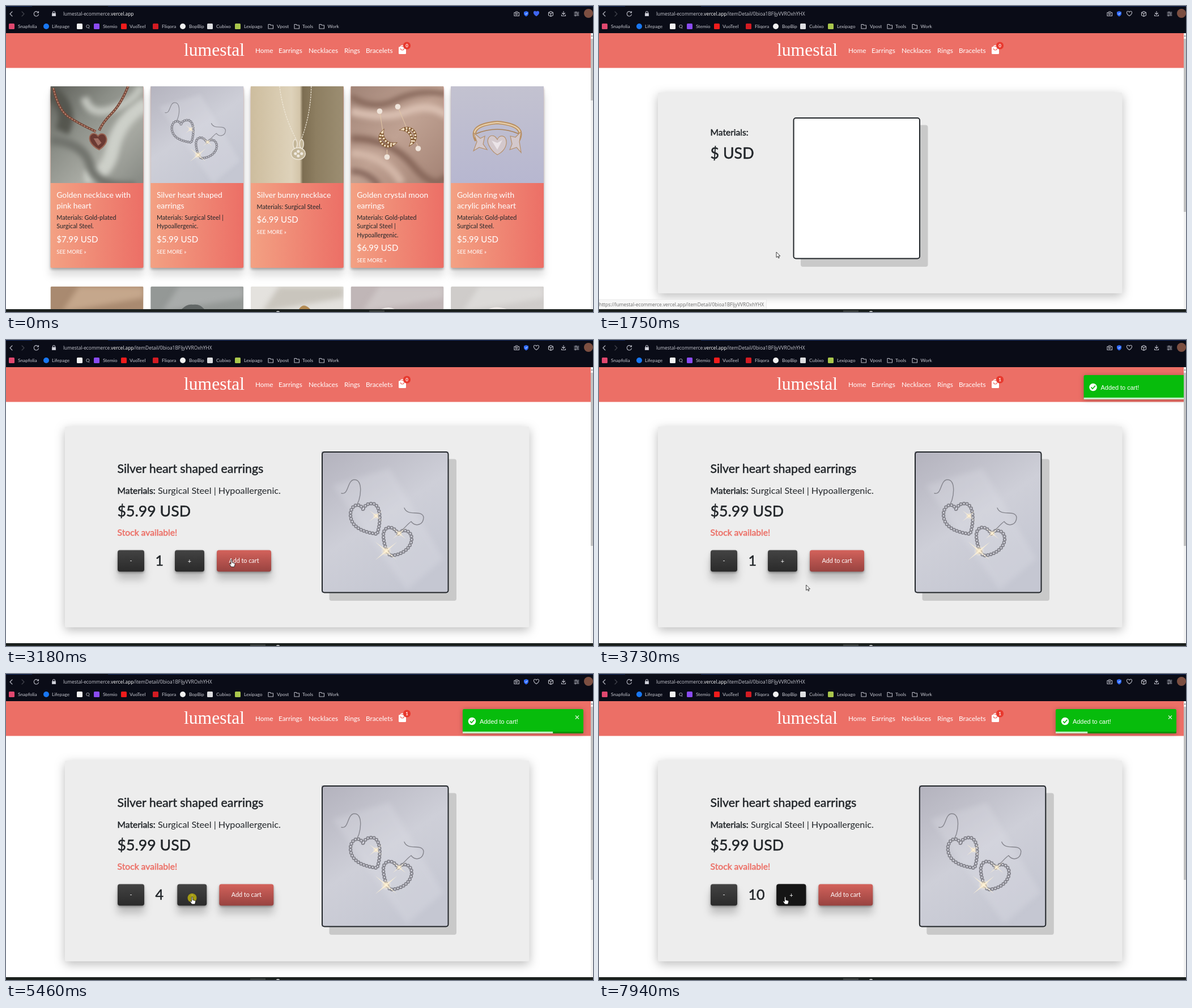
Recreate the animation shown at these times as an HTML page. Size 1036x541 px, loop 8000 ms.

```html
<!DOCTYPE html>
<html lang="en">
<head>
<meta charset="utf-8">
<title>Jewellery shop</title>
<style>
html, body { margin: 0; width: 100%; height: 100%; overflow: hidden; background: #fff }
body > svg { display: block; width: 1036px; height: 541px }
text { font-family: Lato, sans-serif; white-space: pre }
.ui { font: 8.4px "Open Sans", sans-serif; fill: #c9cad2 }
.nav { font-size: 11.8px; fill: #fff }
.logo { font: 31.6px "Liberation Serif", serif; fill: #fff }
.title { font-size: 13.9px; fill: #fff }
.mat { font-size: 10.8px; fill: #212529 }
.price { font-size: 15.1px; fill: #fff }
.more { font-size: 9.4px; fill: #fff }
.dark { fill: #212529 }
.mid { stroke: currentColor; stroke-width: .5; fill: currentColor; color: #212529 }
.line { fill: none; stroke: #b9bac4; stroke-width: 1.1; stroke-linecap: round; stroke-linejoin: round }
.card { filter: drop-shadow(0 3px 2px #0004) drop-shadow(0 13px 7px #0002) }
.panel { filter: drop-shadow(0 5px 9px #0004) }
.btn { filter: drop-shadow(0 2px 2px #0005) drop-shadow(0 13px 7px #0003) }
.soft { filter: blur(5px) }
</style>
</head>
<body>
<svg viewBox="0 0 1036 541">
<defs>
  <linearGradient id="peach"><stop stop-color="#f3a183"/><stop offset="1" stop-color="#ec6f66"/></linearGradient>
  <linearGradient id="black" x2="0" y2="1"><stop stop-color="#434343"/><stop offset="1" stop-color="#2a2a2a"/></linearGradient>
  <linearGradient id="red" x2="0" y2="1"><stop stop-color="#d3625b"/><stop offset="1" stop-color="#984340"/></linearGradient>
  <linearGradient id="satin" x2="1" y2="1"><stop stop-color="#5f605a"/><stop offset=".35" stop-color="#8b8e87"/><stop offset=".65" stop-color="#a9aba4"/><stop offset="1" stop-color="#868983"/></linearGradient>
  <linearGradient id="linen" x2=".6" y2="1"><stop stop-color="#b3b2bd"/><stop offset=".55" stop-color="#cecfd8"/><stop offset="1" stop-color="#c5c7d2"/></linearGradient>
  <linearGradient id="sand"><stop stop-color="#cdbd9e"/><stop offset=".44" stop-color="#ded2ba"/><stop offset=".53" stop-color="#d3c5a9"/><stop offset=".56" stop-color="#7c6d51"/><stop offset=".7" stop-color="#8d7e61"/><stop offset="1" stop-color="#9c8e72"/></linearGradient>
  <linearGradient id="mauve" x2="1" y2="1"><stop stop-color="#a28578"/><stop offset=".5" stop-color="#c0a293"/><stop offset="1" stop-color="#a38274"/></linearGradient>
  <linearGradient id="lilac" x2="0" y2="1"><stop stop-color="#c3c2d0"/><stop offset="1" stop-color="#b7b7d0"/></linearGradient>
  <radialGradient id="glow"><stop stop-color="#fffbe8"/><stop offset=".4" stop-color="#f6dfb4aa"/><stop offset="1" stop-color="#fff0"/></radialGradient>
  <g id="spark"><circle r="6" fill="url(#glow)"/><path d="M-12-10 0-1.2 12-10 1.2 0 12 10 0 1.2-12 10-1.2 0Z" fill="#fff3d6" opacity=".8"/></g>
  <g id="earrings">
    <path fill="url(#linen)" d="M0 0H225V250H0Z"/>
    <path class="soft" fill="#e3e4eb" opacity=".25" d="M20 60 120 30 215 190 150 245Z"/>
    <g fill="none" stroke="#85858d" stroke-width="1.4" stroke-linecap="round">
      <path d="M35 74C48 78 45 50 58 50S70 72 66 86L63 93M146 100C152 116 176 102 180 116C180 130 166 134 158 124C152 128 148 134 143 138"/>
      <path id="beads" stroke-width="6.5" stroke-dasharray="0 5.4" d="M73 102C66 88 50 96 51 113C52 130 66 142 98 146C104 128 106 100 93 93C82 90 76 96 73 102M135 146C126 128 108 132 109 150C110 165 115 178 121 184C140 184 158 172 159 155C159 138 142 136 135 146"/>
      <path stroke="#dcdce6" stroke-width="2.6" stroke-dasharray="0 5.4" d="M73 102C66 88 50 96 51 113C52 130 66 142 98 146C104 128 106 100 93 93C82 90 76 96 73 102M135 146C126 128 108 132 109 150C110 165 115 178 121 184C140 184 158 172 159 155C159 138 142 136 135 146"/>
    </g>
    <use href="#spark" x="96" y="114"/><use href="#spark" x="137" y="145"/>
    <use href="#spark" transform="translate(114 176)scale(1.6)"/>
  </g>
</defs>

<g id="list"></g>

<g id="detail">
  <rect class="panel" x="104" y="153" width="819.5" height="355" rx="2" fill="#ededed"/>
  <g id="frame">
    <rect x="13.5" y="13.5" width="224.5" height="250.5" rx="4" fill="#c9c9c9"/>
    <rect width="224" height="250" rx="4" fill="#fff"/>
    <svg id="photo" width="224" height="250"><use href="#earrings"/></svg>
    <rect x="1" y="1" width="222.5" height="248.5" rx="4" fill="none" stroke="#212529" stroke-width="2"/>
  </g>
  <g id="loading">
    <text class="mid" x="196.5" y="229" font-size="15.6">Materials:</text>
    <text class="mid" x="196.5" y="269.5" font-size="26.8">$ USD</text>
  </g>
  <g id="info">
    <text class="mid" x="196.5" y="234.5" font-size="21.3">Silver heart shaped earrings</text>
    <text class="mid" x="196.5" y="271.5" font-size="15.6">Materials:</text>
    <text class="dark" x="268" y="271.5" font-size="16.2">Surgical Steel | Hypoallergenic.</text>
    <text class="mid" x="196.5" y="312" font-size="26.7">$5.99 USD</text>
    <text class="mid" x="196.5" y="345.5" font-size="15.7" style="color:#ec6f66">Stock available!</text>
    <g font-size="10.8" fill="#fff" text-anchor="middle">
      <rect class="btn" x="197" y="371.5" width="47" height="38" rx="4" fill="url(#black)"/>
      <text x="220.5" y="394">-</text>
      <g id="buttons">
        <rect class="btn" x="298" y="371.5" width="52" height="38" rx="4" fill="url(#black)"/>
        <rect id="pressed" x="298" y="371.5" width="52" height="38" rx="4" fill="#151515"/>
        <text x="324" y="394.5">+</text>
        <rect class="btn" x="372" y="371.5" width="96" height="38" rx="4" fill="url(#red)"/>
        <text x="420" y="394">Add to cart</text>
      </g>
    </g>
    <text id="count" class="mid" x="263.5" y="399" font-size="25"></text>
  </g>
</g>

<path fill="#ec6f66" d="M0 48H1032V109.5H0Z"/>
<text class="logo" x="314" y="87.5">lumestal</text>
<g id="nav" class="nav"></g>
<path fill="#fff" d="M693 73.5q0-1.5 1.5-1.5h10q1.5 0 1.5 1.5v10q0 1.5-1.5 1.5h-10q-1.5 0-1.5-1.5z"/>
<path fill="none" stroke="#fff" stroke-width="1.3" d="M696.5 73a3 3 0 0 1 6 0"/>
<path fill="none" stroke="#ec6f66" stroke-width="1.2" d="M696.5 75a3 3 0 0 0 6 0"/>
<circle cx="707.5" cy="70" r="6.6" fill="#e8392e"/>
<text id="badge" x="707.5" y="73" font-size="8" font-weight="700" fill="#fff" text-anchor="middle"></text>

<g id="toast">
  <rect x="806" y="62" width="213" height="43" rx="2.5" fill="#07bc0c" style="filter:drop-shadow(0 1px 4px #0004)"/>
  <circle cx="822.5" cy="83.5" r="6.8" fill="#fff"/>
  <path d="M819 83.5l2.6 2.7 4.8-5.4" fill="none" stroke="#07bc0c" stroke-width="1.7"/>
  <text x="836" y="87.5" style="font:10.9px 'Liberation Sans',sans-serif" fill="#fff">Added to cart!</text>
  <path d="M1005 73.5l6 6m0-6l-6 6" stroke="#d5f3d6" stroke-width="1.3"/>
  <path d="M806 102H1019V105H806Z" fill="#003c00" opacity=".35"/>
  <rect id="bar" x="806" y="101.8" height="3.2" fill="#c3eec5"/>
</g>

<path fill="#f1f1f1" d="M1032 48h4v488h-4z"/>
<path fill="#777" d="M1032.5 54l1.5-2.5 1.5 2.5z"/>
<rect id="thumb" x="1032" y="58" width="4" fill="#c1c1c1"/>

<path fill="#0a0c17" d="M0 0H1036V48H0Z"/>
<path fill="#12285c" d="M0 0h46v1H0zM180 0h856v1H180z"/>
<g class="line">
  <path d="M11 10l-4 4 4 4"/>
  <path d="M28 10l4 4-4 4" stroke="#44464f"/>
  <path d="M57 11.5a4.2 4.2 0 1 0 .5 3.5M57.5 9.5v2.5h-2.5"/>
  <path d="M82.5 13v-1.5a2 2 0 0 1 4 0V13"/><path d="M81.5 13h6v4.5h-6z" fill="#d5d6de"/>
  <path d="M897 11.5h2l1-1.5h2.5l1 1.5h2v6H897z"/><circle cx="901" cy="14" r="1.6"/>
  <path d="M961.5 9.5l4 2v5l-4 2-4-2v-5zM957.5 11.5l4 2 4-2M961.5 13.5v5"/>
  <path d="M984 9.5v5.5m-2.5-2.5l2.5 2.5 2.5-2.5M980.5 15.5v2h7v-2"/>
  <path d="M1003 11.2h8M1003 14h8M1003 16.8h8M1006 10v2M1009 13v2M1005 16v2" stroke-width="1"/>
</g>
<path fill="#2f6bff" d="M914 10.5l4-1.5 4 1.5v3q0 3-4 5-4-2-4-5z"/>
<path d="M916.2 13.5l1.5 1.5 2.5-3" fill="none" stroke="#fff"/>
<path id="heart" class="line" d="M936 17.5C929 13 931.5 8.5 934 9.3q1.5.3 2 1.7.5-1.4 2-1.7C940.500 8.5 943 13 936 17.5Z"/>
<circle cx="1028" cy="13" r="8" fill="#7c4f41"/>
<text class="ui" x="101" y="17"><tspan>lumestal-ecommerce.</tspan><tspan fill="#fff">vercel.app</tspan><tspan id="path"></tspan></text>
<g id="marks" class="ui"></g>

<g id="status">
  <path fill="#f7f7f7" stroke="#ddd" stroke-width=".6" d="M0 519H295.5V536H0Z"/>
  <text class="ui" x="0" y="530.5" style="fill:#6a6a6a"></text>
</g>
<path fill="#1b201e" d="M0 536H1036V541H0Z"/>
<rect id="task" y="538" width="27" height="3" fill="#393e3c"/>
<path fill="#b8bab9" d="M477 541a3 2 0 0 1 6 0z"/>

<circle id="click" r="8" fill="#b3a90f" opacity=".88"/>
<g id="mouse" fill="#fff" stroke="#111" stroke-width=".8" stroke-linejoin="round">
  <path id="arrow" d="M0 0V9.5L2.3 7.5 3.8 10.8 5.2 10.2 3.8 7H6.8Z"/>
  <path id="hand" d="M-1 0C-1-1.2 1-1.2 1 0V4.5L5 5.5C6.3 5.8 6.3 7 6 8L5 12H-.5L-3.5 7.5C-3.5 6-2.5 6-1 7.5Z"/>
</g>
</svg>

<script>
const $ = id => document.getElementById(id);
const show = (id, on) => $(id).style.display = on ? '' : 'none';
const put = (id, name, value) => $(id).setAttribute(name, value);
const text = (cls, x, y, s) => `<text class="${cls}" x="${x}" y="${y}">${s}</text>`;

const itemPath = '/itemDetail/0bioa1BFljyVVROxhYHX';

$('nav').innerHTML = [['Home', 440], ['Earrings', 481], ['Necklaces', 534], ['Rings', 597], ['Bracelets', 635]]
  .map(([s, x]) => text('', x, 83, s)).join('');

// Bookmarks: label, icon centre, label start, icon colour, round or square
$('marks').innerHTML = [
  ['Snapfolia', 10, 21, '#e0486f', 0], ['Lifepage', 71, 81, '#1877f2', 1], ['Q', 130, 141, '#f2f2f2', 0],
  ['Stemio', 160, 171, '#8a4bf0', 0], ['VuoTeel', 208, 218, '#f01c1c', 0], ['Fliqora', 264, 275, '#d31b22', 0],
  ['BopBip', 312, 323, '#f0f0f0', 1], ['Cubixo', 360, 371, '#dcdde0', 0], ['Lexipago', 409, 420, '#a9c64c', 0],
  ['Vpost', 467, 478], ['Tools', 513, 523], ['Work', 557, 567.5]
].map(([s, c, x, fill, round]) => (fill
  ? `<rect x="${c - 5}" y="31" width="10" height="10" rx="${round ? 5 : 1.5}" fill="${fill}"/>`
  : `<path class="line" d="M${c - 4} 32.5h3l1.5 1.5h4v6h-8.5z"/>`) + text('', x, 39, s)).join('');

$('status').lastElementChild.textContent = 'https://lumestal-ecommerce.vercel.app' + itemPath;

const fill = id => `<path d="M0 0H164V171H0Z" fill="url(#${id})"/>`;
const gems = (color, r, ...points) => points.map(([x, y]) =>
  `<circle cx="${x}" cy="${y}" r="${r}" fill="${color}"/>`).join('');
const stroke = (color, w, d, more = '') => `<path d="${d}" fill="none" stroke="${color}" stroke-width="${w}" ${more}/>`;
const fold = (color, w, d) => stroke(color, w, d, 'class="soft"');

const chain = 'M5 3Q14 42 32 54T80 80M137 0Q124 32 108 48T86 78';
const pendant = fill('satin') +
  fold('#cdd0c9', 24, 'M170 30Q120 60 110 110T60 160') +
  fold('#71736d', 16, 'M0 95Q60 100 70 140T150 176') +
  fold('#55564f', 26, 'M0 10Q40 40 20 80') +
  fold('#c3c6bf', 14, 'M60 20Q70 55 110 40T160 0') +
  stroke('#754638', 4.5, chain) + stroke('#c08e78', 1.6, chain, 'stroke-dasharray="3 2"') +
  `<path d="M84 88C76 78 66 86 70 97Q74 106 86 112 100 102 99 93C97 82 88 82 84 88Z" fill="#6b3a33" stroke="#9a6453" stroke-width="2"/>
   <path d="M76 92l8 0 6 8-6 5z" fill="#a27065"/>`;

const bunny = fill('sand') +
  stroke('#efe8d9', 1.2, 'M51 0Q57 50 81 95M107 0Q106 50 89 95', 'stroke-dasharray="3 1.5"') +
  `<g fill="#c3b698" stroke="#eee7da" stroke-width="1.4">
   <ellipse cx="78.5" cy="102" rx="3.5" ry="8"/><ellipse cx="90" cy="102" rx="3.5" ry="8"/><ellipse cx="84" cy="119" rx="12.5" ry="10.5"/></g>` +
  gems('#efe9e0', 2.6, [79, 119], [84, 123], [90, 119], [84, 115]);

const crescents = 'M56 81A14 14 0 1 0 76 102A19 19 0 0 1 56 81ZM92 76A14 14 0 1 1 107 101A19 19 0 0 0 92 76Z';
const moons = fill('mauve') +
  fold('#846558', 9, 'M0 18Q40 44 80 24T170 14') +
  fold('#d9bfb1', 14, 'M0 44Q60 60 100 44T170 52') +
  fold('#866659', 12, 'M0 92Q70 92 110 140T170 158') +
  fold('#d3b7a8', 14, 'M0 118Q60 120 90 171') +
  fold('#84655a', 10, 'M0 150Q30 150 50 176') +
  stroke('#e2c7a6', 1, 'M51 44L57 82M83 36L98 72M64 112V122M116 100L119 108') +
  stroke('#80572f', 5, crescents) + stroke('#efdcc0', 3.4, crescents, 'stroke-dasharray="3 2.4"') +
  gems('#efe4da', 4.8, [51, 44], [83, 36], [64, 125], [119, 110]);

const ring = fill('lilac') +
  stroke('#a98056', 1.5, 'M44 84Q82 68 120 84') +
  stroke('#b88e60', 6, 'M45 96Q30 68 82 64 134 68 119 96') +
  stroke('#e6cda8', 2.5, 'M43 90Q34 69 82 64 130 69 121 90') +
  `<g fill="#d3c8cc" stroke="#b5906c" stroke-width="1.2">
   <path d="M82 94C74 80 60 90 67 104Q72 115 82 121 96 114 98 101C99 86 86 84 82 94Z"/>
   <path d="M40 82L52 92 60 88 57 102 64 112 50 108 40 114 46 98Z"/><path d="M124 80L114 90 105 88 108 102 104 112 116 108 124 117 121 98Z"/></g>
   <path d="M72 96l10 4 9-5-9 17z" fill="#ebe4e8"/>`;

const hearts = '<use href="#earrings" transform="translate(0 -8)scale(.735)"/>';

const items = [
  [['Golden necklace with', 'pink heart'], ['Materials: Gold-plated', 'Surgical Steel.'], 7, pendant, '#a98a70', '#c5a78c'],
  [['Silver heart shaped', 'earrings'], ['Materials: Surgical Steel |', 'Hypoallergenic.'], 5, hearts, '#949896', '#a9acab'],
  [['Silver bunny necklace'], ['Materials: Surgical Steel.'], 6, bunny, '#e4e2de', '#c9c5bd'],
  [['Golden crystal moon', 'earrings'], ['Materials: Gold-plated', 'Surgical Steel |', 'Hypoallergenic.'], 6, moons, '#c0b6b7', '#cdc6c6'],
  [['Golden ring with', 'acrylic pink heart'], ['Materials: Gold-plated', 'Surgical Steel.'], 5, ring, '#cfccca', '#dcdad8']
];

$('list').innerHTML = items.map(([titles, mats, price, photo, dim, lit], i) => {
  const x = 78.5 + i * 176.65, left = x + 10.8;
  const matY = 339.5 + titles.length * 19, priceY = matY + mats.length * 15.7 + 8.6;
  return `<rect class="card" x="${x}" y="142" width="164" height="321" rx="2" fill="url(#peach)"/>
    <svg x="${x}" y="142" width="164" height="171">${photo}</svg>` +
    titles.map((s, k) => text('title', left, 338.5 + k * 19, s)).join('') +
    mats.map((s, k) => text('mat', left, matY + k * 15.7, s)).join('') +
    text('price', left, priceY, `$${price}.99 USD`) +
    text('more', left, priceY + 20.2, 'SEE MORE »') +
    `<svg x="${x}" y="496" width="164" height="45"><rect width="164" height="60" rx="2" fill="${dim}"/>
     <path class="soft" fill="${lit}" d="M50 0H164V20L20 45Z"/></svg>`;
}).join('') +
  '<path d="M310 536q10-10 20-8 12-2 20 8z" fill="#636867"/><path d="M517 536q8-13 20 0z" fill="#b48c55"/>' +
  '<path d="M662 536q14-6 24 0zM852 536q12-7 32 0z" fill="#eee9e7"/>';

// Eased interpolation between [time, value] keys
function track(t, keys) {
  if (t <= keys[0][0]) return keys[0][1];
  for (let i = 1; i < keys.length; i++) {
    const [t0, a] = keys[i - 1], [t1, b] = keys[i];
    if (t < t1) {
      const p = (t - t0) / (t1 - t0);
      return a + (b - a) * p * p * (3 - 2 * p);
    }
  }
  return keys.at(-1)[1];
}

const route = [[250, 893, 541], [990, 313, 435], [2200, 313, 435], [2900, 398, 389], [3450, 398, 389],
  [3800, 362, 438], [4200, 327, 412], [4400, 327, 412], [4800, 328.5, 395]];
const routeX = route.map(([t, x]) => [t, x]), routeY = route.map(([t, , y]) => [t, y]);
const plusClicks = Array.from({ length: 9 }, (_, i) => 4860 + i * 265);
const clicks = [1300, 3400, ...plusClicks];
const slide = [[3450, 240], [3870, -16], [3975, 7], [4080, -3], [4150, 0]];

function draw(t) {
  const opened = t >= 1610, loaded = t >= 1810, added = t >= 3450;
  show('list', !opened);
  show('detail', opened);
  show('loading', !loaded);
  show('info', loaded);
  show('photo', loaded);
  $('path').textContent = opened ? itemPath : '';
  $('heart').style.cssText = opened ? '' : 'fill:#3f66f0;stroke:#3f66f0';
  put('thumb', 'height', opened ? 306 : 109);
  put('task', 'x', opened ? 431 : 641);
  $('status').style.opacity = t < 1870 ? track(t, [[1060, 0], [1400, 1]]) : 0;

  const count = 1 + plusClicks.filter(c => t >= c).length;
  const shift = count === 1 ? 0 : count < 10 ? 4.3 : 15.3;
  $('count').textContent = count;
  put('buttons', 'transform', `translate(${shift})`);
  put('frame', 'transform', `translate(${!loaded ? 342.5 : count < 10 ? 557 : 564.8} 197)`);
  put('pressed', 'opacity', track(t, [[7000, 0], [7600, 1]]));

  $('badge').textContent = added ? 1 : 0;
  show('toast', added);
  put('toast', 'transform', `translate(${track(t, slide)})`);
  put('bar', 'width', 213 - Math.max(0, t - 4165) * .0415);

  const x = track(t, routeX), y = track(t, routeY);
  const onButton = loaded && y < 409.5 && (x > 372 || x > 298 + shift && x < 350 + shift);
  const hand = t > 1000 && !opened || onButton;
  show('mouse', t >= 250);
  show('hand', hand);
  show('arrow', !hand);
  put('mouse', 'transform', `translate(${x} ${y})`);
  show('click', clicks.some(c => t >= c && t < c + 140));
  put('click', 'transform', `translate(${x} ${y + 1})`);
}

function loop(now) {
  draw(now % 8000);
  requestAnimationFrame(loop);
}
draw(0);
requestAnimationFrame(loop);
</script>
</body>
</html>
```
